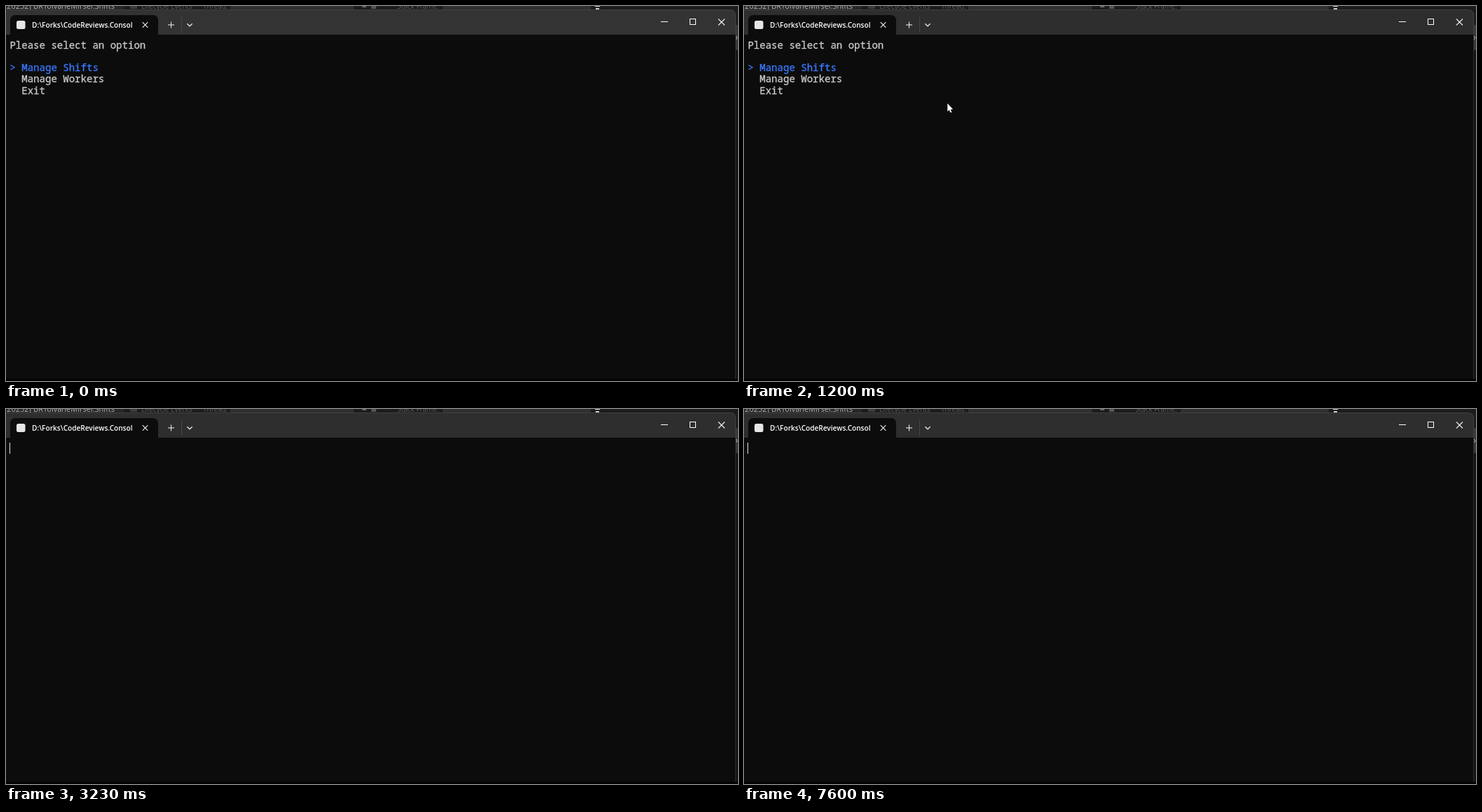
Recreate the animation shown at these times as an HTML page with a canvas. Size 1044x536 px, loop 8000 ms.

```html
<!DOCTYPE html>
<html lang="en">
<head>
<meta charset="utf-8">
<title>Console menu</title>
<style>
html, body { margin: 0; width: 100%; height: 100%; overflow: hidden; background: #0c0c0c; }
canvas { display: block; }
</style>
</head>
<body>
<canvas id="stage" width="1044" height="536"></canvas>
<script>
const ctx = document.getElementById("stage").getContext("2d");
const LOOP = 8000;
const MONO = '500 14.05px "Noto Sans Mono", monospace';
const UI = '"Open Sans", "Noto Sans", sans-serif';
const ROW = 16.2;

const MAIN_MENU = ["Manage Shifts", "Manage Workers", "Exit"];
const SHIFT_MENU = ["ViewAllShifts", "View a single Shift", "Delete a shift",
  "Create a new Shift", "Update a Shift", "Exit"];

function rect(x, y, w, h, color) {
  ctx.fillStyle = color;
  ctx.fillRect(x, y, w, h);
}

function label(text, x, y, color, font, align = "left") {
  ctx.font = font;
  ctx.textAlign = align;
  ctx.fillStyle = color;
  ctx.fillText(text, x, y);
}

function line(color, width, ...points) {
  ctx.strokeStyle = color;
  ctx.lineWidth = width;
  ctx.beginPath();
  points.forEach(([x, y]) => ctx.lineTo(x, y));
  ctx.stroke();
}

function cross(x, y, r) {
  line("#f2f2f2", 1.1, [x - r, y - r], [x + r, y + r]);
  line("#f2f2f2", 1.1, [x - r, y + r], [x + r, y - r]);
}

function rounded(x, y, w, h, radii, color) {
  ctx.beginPath();
  ctx.roundRect(x, y, w, h, radii);
  ctx.fillStyle = color;
  ctx.fill();
}

// Slice of the toolbar behind the console window
function drawBackdrop() {
  rect(0, 0, 1044, 536, "#1c1c1c");
  rect(0, 0, 168, 5, "#272727");
  rect(320, 0, 176, 5, "#303030");
  rect(623, 0, 211, 5, "#303030");
  const font = "10px " + UI;
  label("20252] BRTolvaneMirsel.Shifts", 155, 3.5, "#b4b4b4", "11px " + UI, "right");
  label("Lifecycle Events", 193, 3.5, "#5c5c5c", font);
  label("Thread:", 281, 3.5, "#5c5c5c", font);
  label("Stack Frame:", 558, 3.5, "#5c5c5c", font);
  rect(177, 0, 10, 4, "#3c3c3c");
  rect(508, 0, 6, 2, "#666666");
  rect(521, 0, 7, 4, "#555555");
  rect(840, 0, 7, 1, "#dddddd");
  rect(841, 3, 5, 2, "#cccccc");
  rect(1041, 27, 3, 36, "#383838");
  line("#cccccc", 1, [1041, 43], [1043, 45.5], [1041, 48]);
  rect(1041, 63, 3, 473, "#131313");
}

function drawWindow(barColor) {
  rounded(-10, 5, 1051, 60, [0, 8, 0, 0], "#414141");
  rounded(-10, 6, 1050, 60, [0, 7, 0, 0], barColor);
  rect(0, 41, 1040, 492, "#0c0c0c");
  rect(1040, 41, 1, 492, "#2c2c2c");
  rect(0, 533, 1044, 3, "#020202");

  rounded(6, 13, 211, 28, [7, 7, 0, 0], "#0c0c0c");
  rounded(15, 21, 12.5, 12, 2.5, "#e6e6e6");
  label("D:\\Forks\\CodeReviews.Consol", 37, 31, "#ffffff", "600 10.1px " + UI);
  cross(198.5, 27, 3.8);
  line("#e8e8e8", 1.1, [231, 27], [240, 27]);
  line("#e8e8e8", 1.1, [235.5, 22.5], [235.5, 31.5]);
  line("#464646", 1, [250.5, 16], [250.5, 38]);
  line("#e8e8e8", 1.2, [258.3, 25.2], [262, 28.8], [265.7, 25.2]);

  rect(934, 22, 10, 1, "#ffffff");
  ctx.strokeStyle = "#ffffff";
  ctx.lineWidth = 1;
  ctx.strokeRect(975.5, 18.5, 8, 8);
  cross(1020.5, 23, 4.5);
}

// A hairline stroke gives the console face its medium weight.
function consoleRow(text, row, color) {
  const y = 60.8 + row * ROW;
  label(text, 5.4, y, color, MONO);
  ctx.strokeStyle = color;
  ctx.lineWidth = 0.3;
  ctx.strokeText(text, 5.4, y);
}

function drawMenu(items) {
  consoleRow("Please select an option", 0, "#cccccc");
  items.forEach((item, i) =>
    consoleRow((i ? "  " : "> ") + item, i + 2, i ? "#cccccc" : "#3b78ff"));
}

function drawPointer({ x, y }) {
  ctx.save();
  ctx.translate(x, y);
  ctx.beginPath();
  [[0.2, 0.2], [0.2, 11.8], [2.7, 9.6], [4.5, 13.6], [6.3, 12.8], [4.6, 8.9], [8, 8.6]]
    .forEach(([px, py]) => ctx.lineTo(px, py));
  ctx.closePath();
  ctx.fillStyle = "#ffffff";
  ctx.fill();
  ctx.restore();
}

function pointerAt(t) {
  const step = Math.floor((t + 7) * 15 / 1000);
  const visible = t < 2000 ? step > 0 : t >= 2330 && t < 3000;
  if (!visible) return null;
  if (step <= 13) {
    return { x: 190 + 746 * 0.737 ** (step - 1), y: 131 + 367 * 0.746 ** (step - 1) };
  }
  const p = Math.min((step - 13) / 5, 1);
  const ease = p * p * (3 - 2 * p);
  return { x: 190 + 100 * ease, y: 131 + 8 * ease };
}

function caretOn(t) {
  if (t < 3230) return t >= 2000 && t < 2070;
  const tick = Math.floor((t - 3230) / 66.2);
  const flips = Math.ceil((tick + 1) * 3 / 25) - 1;
  return flips % 2 === 0;
}

function draw(t) {
  drawBackdrop();
  drawWindow(t < 930 ? "#333333" : "#2e2e2e");
  if (t < 2000) drawMenu(MAIN_MENU);
  else if (t >= 2070 && t < 3230) drawMenu(SHIFT_MENU);
  if (caretOn(t)) rect(5, 48, 1, 16, "#e0e0e0");
  const pointer = pointerAt(t);
  if (pointer) drawPointer(pointer);
}

const start = performance.now();
function tick() {
  draw((performance.now() - start) % LOOP);
  requestAnimationFrame(tick);
}
tick();
</script>
</body>
</html>
```
